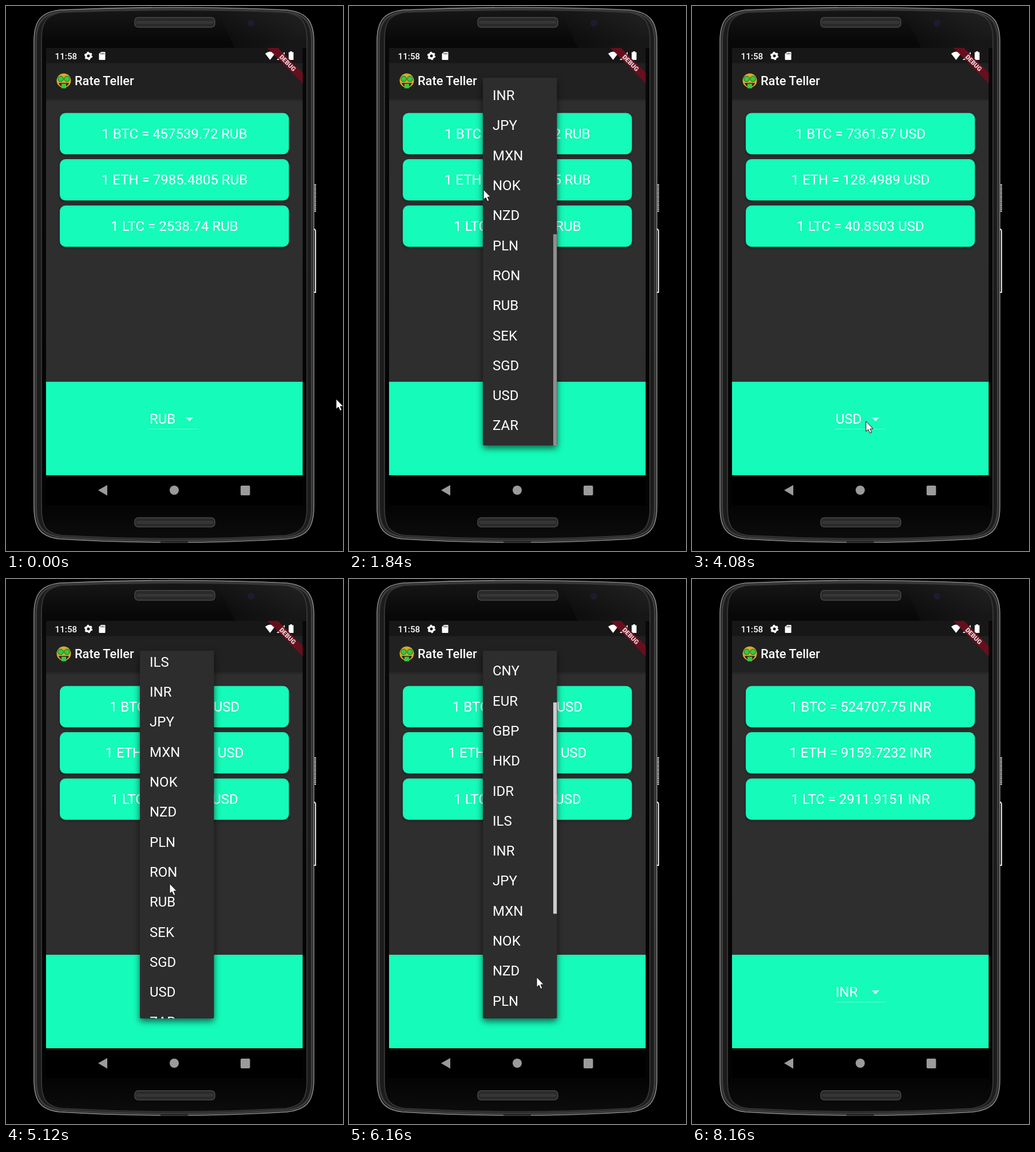
Write an HTML page that moves like this. It is 589 px wide and 950 px high and loops after 8880 ms.

```html
<!DOCTYPE html>
<html lang="en">
<head>
<meta charset="utf-8">
<title>Rate Teller</title>
<style>
  html, body { margin: 0; height: 100%; overflow: hidden; background: #000; }
  svg { display: block; width: 100vw; height: 100vh; }
  text { font: 24px Roboto, sans-serif; fill: #fff; }
  .medium { font-weight: 500; }
  #cards rect { fill: #15fbb9; filter: drop-shadow(0 2px 2px #0006); }
  #cards text { text-anchor: middle; }
  #panel { filter: drop-shadow(0 5px 6px #0009); }
</style>
</head>
<body>
<svg viewBox="0 0 589 950">
  <defs>
    <linearGradient id="body" x2="0" y2="1">
      <stop offset="0" stop-color="#161616"/>
      <stop offset=".06" stop-color="#080808"/>
      <stop offset=".93" stop-color="#030303"/>
      <stop offset="1" stop-color="#0c0c0c"/>
    </linearGradient>
    <linearGradient id="gloss" x2="1" y2=".3">
      <stop offset="0" stop-color="#fff" stop-opacity="0"/>
      <stop offset="1" stop-color="#fff" stop-opacity=".06"/>
    </linearGradient>
    <linearGradient id="barShadow" x2="0" y2="1">
      <stop offset="0" stop-opacity=".3"/>
      <stop offset="1" stop-opacity="0"/>
    </linearGradient>
    <clipPath id="screen"><path d="M70 73H518.500V870H70Z"/></clipPath>
    <clipPath id="menuClip"><rect class="frame" x="234" width="129.500"/></clipPath>
  </defs>

  <!-- Phone shell -->
  <path d="M49 62C49 27 60 11 94 7Q294 -2 491 7C526 11 538 27 538 62V872C538 910 526 925 491 929Q294 941 94 929C60 925 49 910 49 872Z" fill="#1c1c1c" stroke="#8c8c8c" stroke-width="1.600"/>
  <path d="M52.500 62C52.500 30 63 14 96 10Q294 1 489 10C524 14 534.500 30 534.500 62V872C534.500 907 524 922 489 926Q294 938 96 926C63 922 52.500 907 52.500 872Z" fill="none" stroke="#3d3d3d" stroke-width="3"/>
  <path d="M62 58C62 28 70 15 98 11Q294 3 489 11C516 15 526 28 526 58V875C526 907 516 919 489 923Q294 934 98 923C70 919 62 907 62 875Z" fill="url(#body)" stroke="#343434" stroke-width="2"/>
  <path d="M370 10L489 11C516 15 525 28 525 58V73H400Z" fill="url(#gloss)"/>
  <g fill="#2a2a2a" stroke="#484848" stroke-width="1.500">
    <rect x="225" y="20" width="140" height="17" rx="6"/>
    <rect x="225" y="892" width="140" height="16" rx="6"/>
  </g>
  <path d="M230 28.500H360M230 900H360" stroke="#363636" stroke-width="5" stroke-linecap="round"/>
  <circle cx="428" cy="30" r="6" fill="#1c1c30"/>
  <path d="M540.500 311V360" stroke="#ddd" stroke-width="3" stroke-dasharray="2 1.500"/>
  <path d="M538 389Q541 389 541 393V499H538" fill="none" stroke="#e2e2e2" stroke-width="2"/>
  <path d="M270 934H318" stroke="#222" stroke-width="3"/>

  <!-- App -->
  <g clip-path="url(#screen)">
    <path d="M70 73H519V870H70Z"/>
    <path d="M70 161H519V655H70Z" fill="#2e2e2e"/>
    <path d="M70 73H519V100H70Z" fill="#171717"/>
    <path d="M70 99.500H519V161H70Z" fill="#212121"/>
    <path d="M70 161H519V167H70Z" fill="url(#barShadow)"/>
    <path d="M70 655H519V818H70Z" fill="#15fbb9"/>
    <g id="emoji">
      <circle cx="101" cy="130" r="12.500" fill="#d9a928"/>
      <g fill="#35c944" stroke="#1d7a2a" stroke-width="1.200">
        <circle cx="95.500" cy="127" r="4.700"/>
        <circle cx="106.500" cy="127" r="4.700"/>
      </g>
      <path d="M92 134H110Q108 141 101 141T92 134Z" fill="#3a2a12"/>
      <path d="M97 135.500H105V143.500H97Z" fill="#35c944"/>
    </g>
    <text class="medium" x="120" y="138" style="font-size:21.800px">Rate Teller</text>
    <g id="cards"></g>
    <text id="choice" x="251" y="728"></text>
    <path d="M314 717H327.500L320.700 724Z" fill="#fff" opacity=".75"/>
    <path d="M249 737.500H337" stroke="#fff" opacity=".35"/>

    <g id="menu">
      <rect id="panel" class="frame" x="234" width="129.500" rx="2" fill="#2d2d2d"/>
      <g clip-path="url(#menuClip)">
        <g id="items"></g>
        <rect id="thumb" x="357" width="6.500" fill="#ccc"/>
      </g>
    </g>

    <text class="medium" x="85.500" y="92.500" style="font-size:15.250px">11:58</text>
    <g fill="#fff">
      <circle cx="144" cy="87" r="4.200" fill="none" stroke="#fff" stroke-width="3.400"/>
      <circle cx="144" cy="87" r="6.200" fill="none" stroke="#fff" stroke-width="2" stroke-dasharray="3.250"/>
      <path d="M166 80H172.500Q173.500 80 173.500 81V93Q173.500 94 172.500 94H163.500Q162.500 94 162.500 93V83.500Z"/>
      <path d="M453 83Q461.500 76 470 83L461.500 94Z"/>
      <path d="M487 80V94H473Z"/>
      <path d="M496.500 79H500V80.500H502.500V94H494V80.500H496.500Z"/>
    </g>
    <path d="M166 81.500V84.500M168.500 81.500V84.500M171 81.500V84.500" stroke="#171717"/>
    <g transform="translate(518.500 73) rotate(45)">
      <path d="M-44 30.500H44V43.600H-44Z" fill="#700e1e" opacity=".9"/>
      <text y="41" text-anchor="middle" style="font-size:11px;font-weight:900;fill:#eadde0">DEBUG</text>
    </g>
    <g fill="#9b9b9b">
      <path d="M161 844L177 835V853.500Z"/>
      <circle cx="294" cy="844" r="8"/>
      <rect x="410" y="836" width="16.500" height="17" rx="2"/>
    </g>
  </g>

  <path id="cursor" d="M0 0V17.500L4 14L7 20.500L10 19.200L7.200 13H12.500Z" fill="#fff" stroke="#111"/>
</svg>

<script>
const LOOP = 8880, STEP = 80;
const ITEM = 52.3, PADDING = 8.75, TOP = 125, HEIGHT = 641;
const CODES = 'AUD BRL CAD CNY EUR GBP HKD IDR ILS INR JPY MXN NOK NZD PLN RON RUB SEK SGD USD ZAR'.split(' ');
const CONTENT = CODES.length * ITEM + 2 * PADDING;
const COINS = ['BTC', 'ETH', 'LTC'];

// Each entry takes effect at its time.
const CHOICES = [[0, 'RUB'], [2720, 'USD'], [6480, 'INR']];
const RATES = [
  [0, 'RUB', ['457539.72', '7985.4805', '2538.74']],
  [4000, 'USD', ['7361.57', '128.4989', '40.8503']],
  [7760, 'INR', ['524707.75', '9159.7232', '2911.9151']]
];
const MENUS = [[1080, 2720], [4520, 6480]];
const CURSOR_GONE = 8160;

// Eased tracks: time followed by values.
const POINTER = [
  [0, 577, 685], [640, 300, 718], [1440, 300, 718], [1600, 288, 540],
  [1840, 235, 320], [2000, 232, 312], [2560, 293, 683], [3000, 293, 683],
  [3360, 304, 724], [4600, 304, 724], [4960, 286, 531], [5120, 286, 531],
  [5520, 300, 397], [5700, 300, 397], [6080, 328, 694], [6160, 328, 694],
  [6400, 279, 474], [7040, 279, 474], [7280, 276, 472], [7760, 276, 472],
  [8080, 535, 542]
];
const SCROLL = [[1620, 277], [1840, 475], [2720, 475], [4520, 434], [5720, 434], [6080, 157]];
const THUMB = [[1680, 0], [1960, 1], [2440, 1], [2740, 0], [5760, 0], [6060, 1]];

const $ = id => document.getElementById(id);
const clamp = v => Math.max(0, Math.min(1, v));
const mix = (a, b, k) => a + (b - a) * k;
const latest = (list, t) => list.filter(entry => entry[0] <= t).pop();

function track(keys, t) {
  const next = keys.findIndex(key => key[0] > t);
  if (next < 1) return keys.at(next).slice(1);
  const a = keys[next - 1], b = keys[next];
  const k = (t - a[0]) / (b[0] - a[0]);
  return a.slice(1).map((v, i) => mix(v, b[i + 1], k * k * (3 - 2 * k)));
}

function add(parent, tag, attributes) {
  const node = document.createElementNS('http://www.w3.org/2000/svg', tag);
  return parent.appendChild(set(node, attributes));
}

function set(node, attributes) {
  for (const name in attributes) node.setAttribute(name, attributes[name]);
  return node;
}

const cardTexts = COINS.map((coin, i) => {
  const y = 186.5 + i * 80.6;
  add($('cards'), 'rect', { x: 94, y, width: 400.5, height: 72, rx: 10 });
  return add($('cards'), 'text', { x: 294.5, y: y + 44 });
});
const items = CODES.map((code, i) => {
  const node = add($('items'), 'text', { x: 251, y: TOP + PADDING + (i + .5) * ITEM + 8.5 });
  node.textContent = code;
  return node;
});
const frames = document.querySelectorAll('.frame');

function drawMenu(t, choice) {
  const span = MENUS.find(([open, close]) => t >= open && t < close);
  $('menu').style.display = span ? '' : 'none';
  if (!span) return;

  // Fade in, grow out of the button, then reveal the items one by one.
  const phase = (t - span[0]) / 300;
  const grow = clamp((phase - .25) * 4);
  const y = mix(693, TOP, grow), bottom = mix(746, TOP + HEIGHT, grow);
  $('menu').style.opacity = clamp(phase * 4);
  frames.forEach(node => set(node, { y, height: bottom - y }));

  const unit = .5 / (CODES.length + 1.5);
  items.forEach((node, i) => {
    const shown = CODES[i] === choice ? 1 : clamp((phase - .5 - (i + 1) * unit) / (1.5 * unit));
    node.style.opacity = shown;
  });

  const [scroll] = track(SCROLL, t);
  set($('items'), { transform: `translate(0 ${-scroll})` });
  set($('thumb'), {
    y: TOP + scroll * HEIGHT / CONTENT,
    height: HEIGHT * HEIGHT / CONTENT,
    opacity: track(THUMB, t)[0]
  });
}

function draw() {
  const t = Math.floor(performance.now() % LOOP / STEP) * STEP;
  const choice = latest(CHOICES, t)[1];
  const [, currency, rates] = latest(RATES, t);
  $('choice').textContent = choice;
  cardTexts.forEach((node, i) => node.textContent = `1 ${COINS[i]} = ${rates[i]} ${currency}`);
  drawMenu(t, choice);
  set($('cursor'), { transform: `translate(${track(POINTER, t)})` });
  $('cursor').style.display = t < CURSOR_GONE ? '' : 'none';
  requestAnimationFrame(draw);
}
draw();
</script>
</body>
</html>
```
